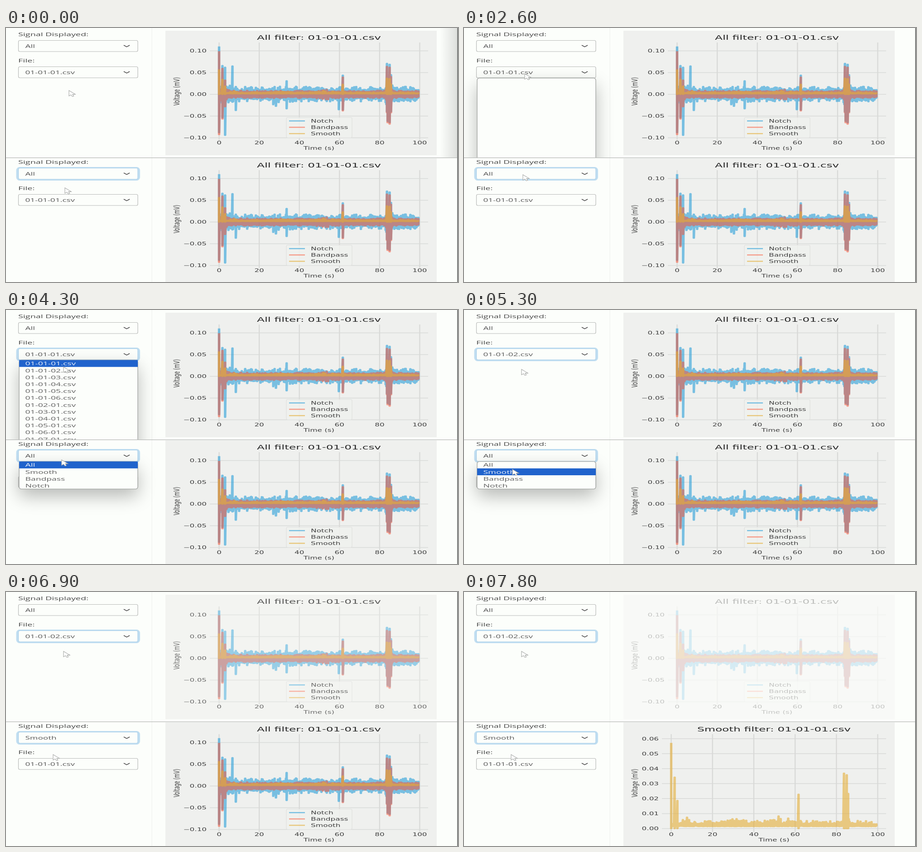
Recreate the animation shown at these times as an HTML page with a canvas. Size 998 by 561 pixels, loop 8000 ms.

```html
<!DOCTYPE html>
<html lang="en">
<head>
<meta charset="utf-8">
<title>Signal viewer</title>
<style>
html, body { margin: 0; width: 100%; height: 100%; overflow: hidden; background: #fcfefb; }
canvas { display: block; width: 998px; height: 561px; }
</style>
</head>
<body>
<canvas id="stage" width="998" height="561"></canvas>
<script>
const ctx = document.getElementById('stage').getContext('2d');
const LOOP = 8000, STEP = 100;
const WIDE = 1.75;            // the whole screen is stretched sideways
const PANE = 282;             // distance between the two panes
const ROW = 15.2;             // menu row height
const PAGE = '#fcfefb', PANEL = '#eff0ee', INK = '#404040', GRID = '#d8d9d7';
const UI = '"Open Sans", sans-serif', CHART = '"DejaVu Sans", sans-serif';
const BLUE = 'rgba(48,162,218,.62)', RED = 'rgba(252,79,48,.51)', AMBER = 'rgba(229,174,56,.6)';

const FILTERS = ['All', 'Smooth', 'Bandpass', 'Notch'];
const FILES = Array.from({ length: 12 }, (_, i) =>
  i < 6 ? `01-01-0${i + 1}.csv` : `01-0${i - 4}-01.csv`);

// Keys: time, then values
const TOP_PATH = [[0, 139, 138], [700, 134, 115], [1900, 134, 101], [3200, 134, 101],
  [4200, 127, 125], [5000, 127, 131]];
const LOW_PATH = [[0, 130, 353], [700, 130, 329], [1800, 130, 324], [3200, 130, 324],
  [4200, 125, 328], [5000, 107, 352], [5800, 107, 352], [6000, 104, 359]];
const FADE = [[6500, 1], [6900, .77], [7300, .3]];

// Spikes: time, highest and lowest voltage
const BURSTS = [[0, .11, -.088], [1.6, .066, -.054], [3, .036, -.027], [61.6, .044, -.036],
  [83.5, .071, -.04], [84, .045, -.062], [85, .069, -.065], [85.7, .045, -.04]];
const HUM = [[3, .062, -.094], [6.5, .065, -.018], [8.3, .018, -.037],
  [33.8, .031, -.033], [59.5, .013, -.035]];

function at(keys, t) {
  const i = keys.findIndex(key => t < key[0]);
  if (i < 1) return keys[i ? keys.length - 1 : 0].slice(1);
  const a = keys[i - 1], b = keys[i];
  const k = (t - a[0]) / (b[0] - a[0]);
  return a.slice(1).map((v, j) => v + (b[j + 1] - v) * k);
}

function random(seed) {
  return () => {
    seed = (seed * 1664525 + 1013904223) >>> 0;
    return seed / 4294967296;
  };
}

const bump = (t, mid, width) => Math.exp(-(((t - mid) / width) ** 2));

// Envelope with three samples per second: noise plus scaled spikes
function makeSignal(seed, high, low, spikes, up, down) {
  const rnd = random(seed), data = [];
  for (let t = 0; t < 99.5; t += 1 / 3) data.push([t, high(t, rnd() ** 3), low(t, rnd() ** 3)]);
  for (const [t, hi, lo] of spikes) {
    const d = data[Math.round(t * 3)];
    d[1] = Math.max(d[1], hi * up);
    d[2] = Math.min(d[2], lo * down);
  }
  return data;
}

const notch = makeSignal(11,
  (t, r) => .0095 + .009 * r + .006 * bump(t, 2, 4) + .025 * bump(t, 84.7, 1.2),
  (t, r) => -.009 - .008 * r - .012 * r * bump(t, 30, 5) - .006 * bump(t, 2, 4) - .025 * bump(t, 84.7, 1.2),
  [...BURSTS, ...HUM], 1, 1);
const band = makeSignal(23,
  (t, r) => .006 + .003 * r + .006 * bump(t, 2, 3) + .004 * r * bump(t, 54, 4) + .02 * bump(t, 84.7, 1.2),
  (t, r) => -.006 - .003 * r - .008 * bump(t, 2, 2) - .005 * r * bump(t, 54, 4) - .025 * bump(t, 84.7, 1.2),
  BURSTS, .9, 1.05);
const smooth = makeSignal(37,
  (t, r) => .0033 + .0022 * r + .004 * bump(t, 7, 2) * (.4 + r) + .0015 * bump(t, 31, 4)
    + .004 * r * bump(t, 53, 4) + .008 * bump(t, 84.7, 1.2) - .0008 * bump(t, 100, 4),
  (t, r) => .0014 + .0004 * r + .002 * bump(t, 84.7, 1.2),
  BURSTS, .52, 0);

function text(str, x, y, size, color, family, align = 'left', angle = 0) {
  ctx.save();
  ctx.translate(x, y);
  ctx.scale(WIDE, 1);
  ctx.rotate(angle);
  ctx.font = size + 'px ' + family;
  ctx.fillStyle = color;
  ctx.textAlign = align;
  ctx.fillText(str, 0, 0);
  ctx.restore();
}

function strokeWide(color, width) {
  ctx.save();
  ctx.scale(WIDE, 1);
  ctx.strokeStyle = color;
  ctx.lineWidth = width;
  ctx.lineJoin = 'round';
  ctx.stroke();
  ctx.restore();
}

function line(x1, y1, x2, y2, color, width) {
  ctx.beginPath();
  ctx.moveTo(x1, y1);
  ctx.lineTo(x2, y2);
  strokeWide(color, width);
}

function box(x, y, w, h, r, fill, edge, width) {
  ctx.beginPath();
  ctx.roundRect(x, y, w, h, r);
  ctx.fillStyle = fill;
  ctx.fill();
  ctx.strokeStyle = edge;
  ctx.lineWidth = width;
  ctx.stroke();
}

function trace(data, color, px, py) {
  ctx.beginPath();
  for (const [t, hi, lo] of data) {
    ctx.lineTo(px(t), py(hi));
    ctx.lineTo(px(t), py(lo));
  }
  strokeWide(color, 3.1);
}

// Axes run from `left` to 932; `zero` and `unit` place the voltages
function chart(top, title, left, zero, unit, low, high, step, signals) {
  const x0 = left + 20.5, mid = (left + 932) / 2;
  const px = t => x0 + t * (913.5 - x0) / 100;
  const py = v => top + zero - v * unit;
  ctx.fillStyle = PANEL;
  ctx.fillRect(352, top + 6, 599, 275);
  for (let t = 0; t <= 100; t += 20) {
    line(px(t), top + 32, px(t), top + 248, GRID, 1.3);
    text(t, px(t), top + 257, 9.6, INK, CHART, 'center');
  }
  for (let n = Math.round(low / step); n <= Math.round(high / step); n++) {
    const y = py(n * step);
    line(left, y, 932, y, GRID, 1.5);
    text((n < 0 ? '\u2212' : '') + Math.abs(n * step).toFixed(2), left - 7, y + 3.5, 9.6, INK, CHART, 'right');
  }
  for (const [data, color] of signals) trace(data, color, px, py);
  text(title, mid, top + 26.3, 14.2, '#282828', CHART, 'center');
  text('Time (s)', mid, top + 269, 9.6, INK, CHART, 'center');
  text('Voltage (mV)', 382.5, top + 140, 9.6, INK, CHART, 'center', -Math.PI / 2);
}

function allChart(top) {
  chart(top, 'All filter: 01-01-01.csv', 450, 146.5, 961, -.1, .1, .05,
    [[notch, BLUE], [band, RED], [smooth, AMBER]]);
  box(619, top + 197.5, 145, 45, 3, 'rgba(240,241,239,.85)', '#dfe0de', 1.2);
  [['Notch', BLUE], ['Bandpass', RED], ['Smooth', AMBER]].forEach(([name, color], i) => {
    const y = top + 205.3 + i * 14;
    line(625, y, 660, y, color, 2.6);
    text(name, 673, y + 3.4, 9.7, INK, CHART);
  });
}

function smoothChart(top) {
  chart(top, 'Smooth filter: 01-01-01.csv', 437, 240.5, 3308, 0, .06, .01, [[smooth, AMBER]]);
}

function field(label, value, y, focused) {
  text(label, 27, y + 18, 11.3, '#484848', UI);
  if (focused) box(25, y + 27.5, 268.5, 25, 5, PAGE, '#c1def1', 5);
  box(27.5, y + 27.5, 263.5, 24.5, 3, PAGE, focused ? '#a9cfe9' : '#b9bbb9', 1.2);
  text(value, 42.5, y + 43.8, 10.8, '#585858', UI);
  ctx.beginPath();
  ctx.moveTo(260, y + 38);
  ctx.lineTo(266.5, y + 41.6);
  ctx.lineTo(273, y + 38);
  strokeWide('#4a4a4a', 1.3);
}

function menu(y, height, items, active) {
  ctx.save();
  ctx.shadowColor = 'rgba(0,0,0,.27)';
  ctx.shadowBlur = 38;
  ctx.shadowOffsetY = 16;
  ctx.beginPath();
  ctx.roundRect(29, y, 262, height, 5);
  ctx.fillStyle = PAGE;
  ctx.fill();
  ctx.restore();
  box(29, y, 262, height, 5, PAGE, '#a5a7a5', 1.4);
  items.forEach((name, i) => {
    const row = y + i * ROW;
    if (i === active) {
      ctx.fillStyle = '#2063cc';
      ctx.fillRect(29, row, 262, ROW);
    }
    text(name, 42.5, row + 11.8, 11, i === active ? '#e8effb' : '#606060', UI);
  });
}

function pointer(x, y) {
  ctx.beginPath();
  [[0, 0], [0, 12], [4.5, 9.6], [7.5, 13.4], [10.6, 12.4], [8, 8.6], [14, 8.4]]
    .forEach(([dx, dy]) => ctx.lineTo(x + dx, y + dy));
  ctx.closePath();
  ctx.fillStyle = '#fdfefd';
  ctx.fill();
  ctx.strokeStyle = '#a6a8a6';
  ctx.lineWidth = 1.1;
  ctx.stroke();
}

function pane(y, height, paint) {
  ctx.save();
  ctx.beginPath();
  ctx.rect(0, y, 998, height);
  ctx.clip();
  ctx.fillStyle = PAGE;
  ctx.fillRect(0, y, 998, height);
  ctx.fillStyle = '#f2f4f1';
  ctx.fillRect(321.5, y, 1.5, height);
  paint();
  ctx.restore();
}

function edgeShade() {
  const shade = ctx.createLinearGradient(958, 0, 996, 0);
  shade.addColorStop(0, 'rgba(0,0,0,0)');
  shade.addColorStop(1, 'rgba(0,0,0,.12)');
  ctx.fillStyle = shade;
  ctx.fillRect(958, 0, 38, 286);
}

function topPane(t) {
  const [x, y] = at(TOP_PATH, t);
  const loaded = t >= 2800;
  allChart(0);
  ctx.globalAlpha = 1 - at(FADE, t)[0];
  ctx.fillStyle = PAGE;
  ctx.fillRect(351, 5, 602, 277);
  ctx.globalAlpha = 1;
  if (t < 2400) edgeShade();
  field('Signal Displayed:', 'All', 0, false);
  field('File:', FILES[t >= 5200 ? 1 : 0], 58, loaded);
  if (t >= 2400 && t < 5200) menu(110.5, 300, loaded ? FILES : [], y > 126 ? 1 : 0);
  pointer(x, y);
}

function lowPane(t) {
  const [x, y] = at(LOW_PATH, t);
  if (t < 7100) allChart(PANE);
  else smoothChart(PANE);
  field('Signal Displayed:', FILTERS[t >= 6200 ? 1 : 0], PANE, true);
  field('File:', FILES[0], PANE + 58, false);
  if (t >= 2800 && t < 6200) menu(334.6, 4 * ROW, FILTERS, y > 350 ? 1 : 0);
  pointer(x, y);
}

function draw(t) {
  pane(0, 287, () => topPane(t));
  pane(287, 274, () => lowPane(t));
  ctx.fillStyle = '#b4b6b4';
  ctx.fillRect(0, 286, 996, 1.2);
  ctx.fillStyle = '#6a6c6a';
  ctx.fillRect(996.3, 0, 1.7, 561);
}

const start = performance.now();
function tick() {
  const t = (performance.now() - start) % LOOP;
  draw(Math.floor(t / STEP) * STEP);
  requestAnimationFrame(tick);
}
tick();
</script>
</body>
</html>
```
